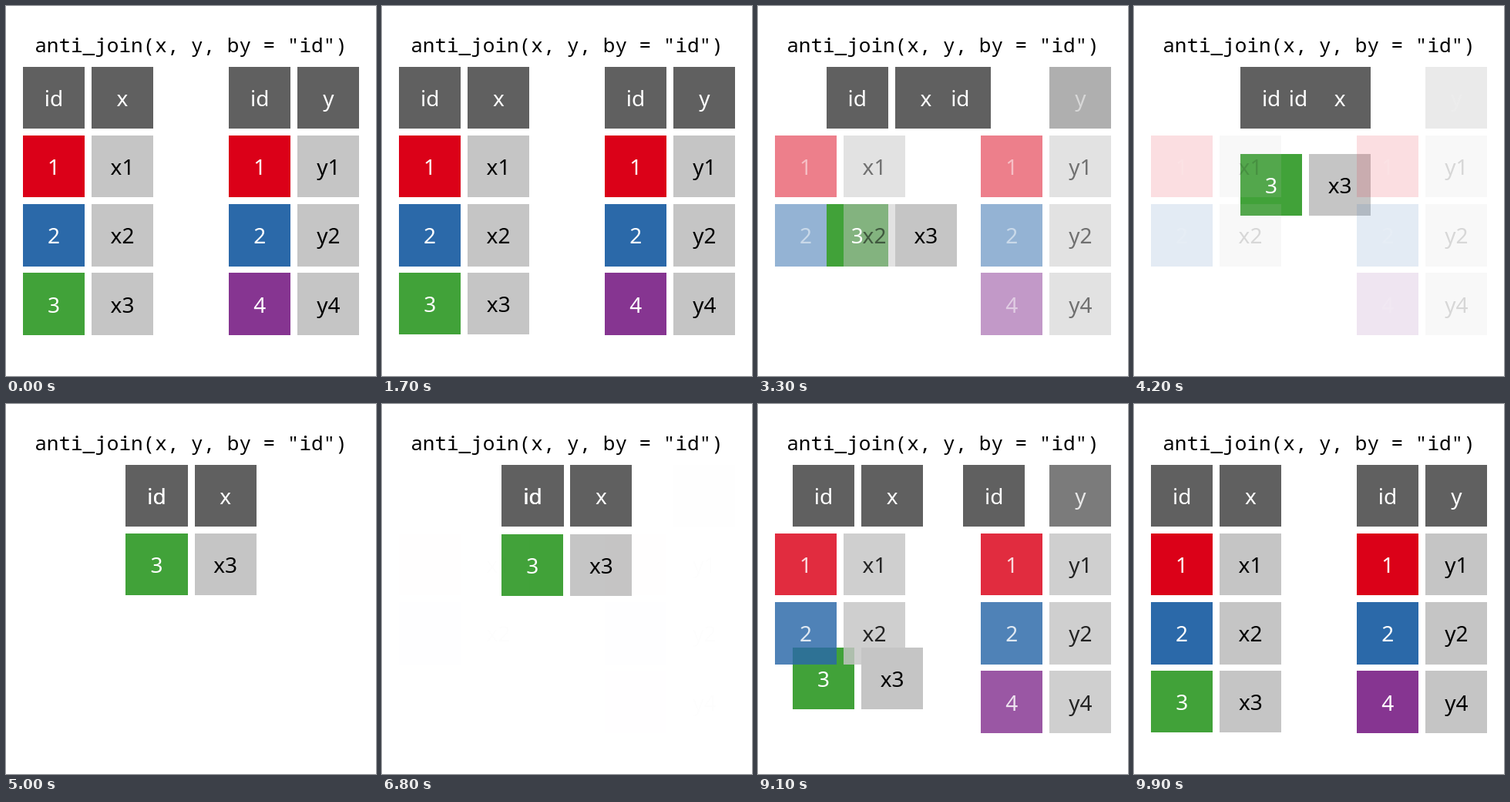
An HTML page for the animation above (10000 ms loop, 480x480 px).

```html
<!DOCTYPE html>
<html lang="en">
<head>
<meta charset="utf-8">
<title>anti_join</title>
<style>
  html, body { margin: 0; width: 100%; height: 100%; overflow: hidden; background: #fff; }
  svg { display: block; width: 100%; height: 100%; }
  text { text-anchor: middle; }
  #labels { font: 28px "Fira Sans", "Noto Sans", "Open Sans", sans-serif; }
  #title { font: 26px "Fira Mono", "Noto Sans Mono", "DejaVu Sans Mono", monospace; }
</style>
</head>
<body>
<svg viewBox="0 0 480 480">
  <text id="title" x="240" y="60">anti_join(x, y, by = "id")</text>
  <g id="tiles" shape-rendering="crispEdges"></g>
  <g id="labels"></g>
</svg>
<script>
const LOOP = 10000, STEP = 100;
const LEFT = 21.8, TOP = 79.15, PITCH = 89.1, SIZE = 80.2;
const HEAD = '#606060', RED = '#db0018', BLUE = '#2b69a9',
      GREEN = '#41a239', PURPLE = '#863591', GREY = '#c5c5c5';

// label, colour, column, row, then the place in the result; cells without one fade
const cells = [
  ['id', HEAD, 0, 0, 1.5, 0],
  ['id', HEAD, 3, 0, 1.5, 0],
  ['x', HEAD, 1, 0, 2.5, 0],
  ['y', HEAD, 4, 0],
  ['1', RED, 0, 1],
  ['2', BLUE, 0, 2],
  ['3', GREEN, 0, 3, 1.5, 1],
  ['x3', GREY, 1, 3, 2.5, 1],
  ['x1', GREY, 1, 1],
  ['x2', GREY, 1, 2],
  ['1', RED, 3, 1],
  ['2', BLUE, 3, 2],
  ['4', PURPLE, 3, 3],
  ['y1', GREY, 4, 1],
  ['y2', GREY, 4, 2],
  ['y4', GREY, 4, 3]
].map(([label, color, col, row, toCol, toRow]) => ({
  col, row, toCol, toRow,
  fades: toCol === undefined,
  rect: add('tiles', 'rect', color),
  text: add('labels', 'text', color === GREY ? '#000' : '#fff', label)
}));

const tiles = document.getElementById('tiles');
const redTile = cells[4].rect, greenTile = cells[6].rect, greyTile = cells[7].rect;

function add(parent, tag, fill, content = '') {
  const el = document.createElementNS('http://www.w3.org/2000/svg', tag);
  el.setAttribute('fill', fill);
  el.textContent = content;
  return document.getElementById(parent).appendChild(el);
}

function set(el, attrs) {
  for (const key in attrs) el.setAttribute(key, attrs[key]);
}

const ease = t => (1 - Math.cos(Math.PI * t)) / 2;
const mix = (a, b, p) => a + (b - a) * p;

// 0 = both tables, 1 = joined result
function progress(t) {
  if (t < 1600) return 0;
  if (t < 5000) return ease((t - 1600) / 3400);
  if (t < 6700) return 1;
  return 1 - ease((t - 6700) / 3300);
}

function place(cell, p) {
  const x = LEFT + PITCH * (cell.fades ? cell.col : mix(cell.col, cell.toCol, p));
  const y = TOP + PITCH * (cell.fades ? cell.row : mix(cell.row, cell.toRow, p));
  const opacity = cell.fades ? 1 - p : 1;
  const left = Math.round(x), top = Math.round(y);
  set(cell.rect, {
    x: left, y: top, opacity,
    width: Math.round(x + SIZE) - left,
    height: Math.round(y + SIZE) - top
  });
  set(cell.text, { x: x + SIZE / 2, y: y + SIZE / 2 + 11, opacity });
}

let last = -1;
function draw(now) {
  const t = Math.floor(now % LOOP / STEP) * STEP;
  if (t === last) return;
  last = t;
  // on the way back the green tile passes below the fading ones
  tiles.insertBefore(greenTile, t >= 5000 ? redTile : greyTile);
  const p = progress(t);
  cells.forEach(cell => place(cell, p));
}

const start = performance.now();
function tick() {
  draw(performance.now() - start);
  requestAnimationFrame(tick);
}
tick();
</script>
</body>
</html>
```
